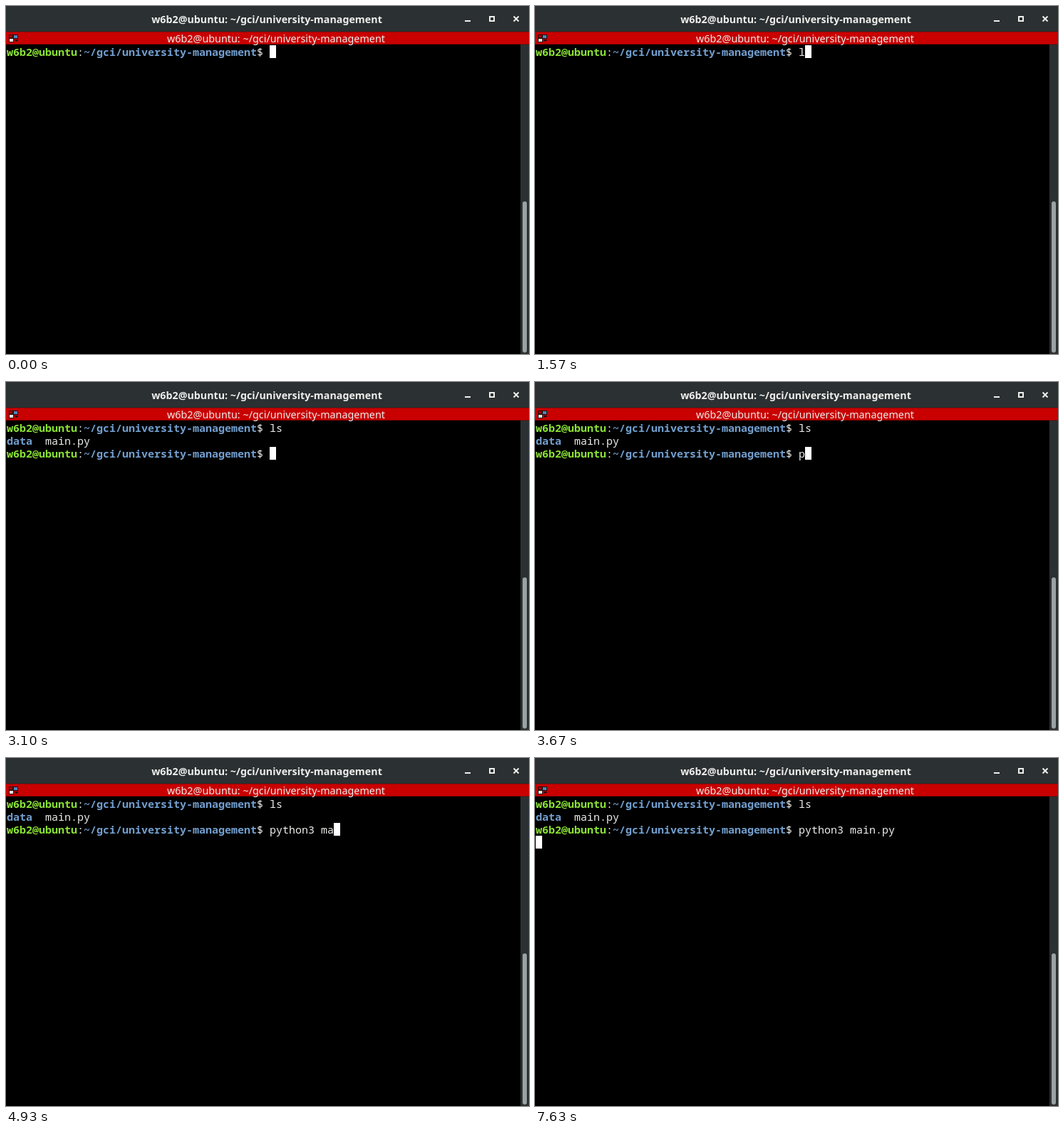
Animation of 734 by 488 pixels, one loop 8 s. Source, as an HTML page:

```html
<!DOCTYPE html>
<html lang="en">
<head>
<meta charset="utf-8">
<title>Terminal session</title>
<style>
  html, body { margin: 0; width: 100%; height: 100%; overflow: hidden; background: #000; }
  svg { display: block; width: 734px; height: 488px; }
  text { white-space: pre; fill: #eeeeec; }
  .bar { font-family: "Noto Sans", sans-serif; text-anchor: middle; }
  .title { font-size: 14.25px; font-weight: 700; }
  .tab { font-size: 14.35px; }
  .row { font: 15px "Noto Sans Mono", monospace; }
  .user { font-weight: 700; fill: #8ae234; }
  .dir { font-weight: 700; fill: #729fcf; }
  .icons { fill: none; stroke: #eeeeec; stroke-width: 2; }
</style>
</head>
<body>
<svg viewBox="0 0 734 488">
  <rect width="734" height="488"/>

  <!-- Title bar -->
  <rect width="734" height="37" fill="#2b3032"/>
  <text class="bar title" x="366" y="24">w6b2@ubuntu: ~/gci/university-management</text>
  <g class="icons">
    <path d="M644 21h8M712.5 14.5l7 7m0-7l-7 7"/>
    <rect x="679" y="15" width="6" height="6"/>
  </g>

  <!-- Tab bar -->
  <rect y="36" width="734" height="18" fill="#8e0000"/>
  <rect y="37" width="734" height="16" fill="#c80000"/>
  <text class="bar tab" x="379" y="51">w6b2@ubuntu: ~/gci/university-management</text>
  <g stroke="#201010">
    <rect x="4.5" y="40.5" width="5" height="4" fill="#b00000"/>
    <rect x="10.5" y="40.5" width="6" height="5" fill="#4f87b8"/>
    <rect x="4.5" y="45.5" width="6" height="5" fill="#e6e6e4"/>
    <path d="M12 47.5h5l-2.5 2z" fill="#201010"/>
  </g>

  <!-- Scrollbar -->
  <rect x="722" y="54" width="12" height="434" fill="#2b3032"/>
  <rect x="725" y="274" width="6" height="212" rx="3" fill="#9aa2a2"/>

  <rect id="cursor" width="9" height="18" fill="#fff"/>
  <g id="rows"></g>
</svg>
<script>
const LOOP = 8000, BLINK = 600, CELL = 9, ROW = 18, LEFT = 1, TOP = 55;
const prompt = '<tspan class="user">w6b2@ubuntu</tspan>:' +
  '<tspan class="dir">~/gci/university-management</tspan>$ ';
const promptLength = 41;

// Each key press: time, text typed so far, row on which the cursor stands.
const keys = [
  [-30, '', 0], [1570, 'l', 0], [1700, 'ls', 0], [1900, '', 2],
  [3270, 'p', 2], [3700, 'py', 2], [3830, 'pyt', 2], [4000, 'pyth', 2],
  [4300, 'pytho', 2], [4350, 'python', 2], [4400, 'python3', 2],
  [4500, 'python3 ', 2], [4770, 'python3 m', 2], [4870, 'python3 ma', 2],
  [5000, 'python3 main.py ', 2], [5200, '', 3]
];

const rows = document.getElementById('rows');
const cursor = document.getElementById('cursor');
let shown;

function linesFor(typed, row) {
  if (row === 0) return [prompt + typed];
  const command = row === 3 ? 'python3 main.py' : typed;
  return [prompt + 'ls', '<tspan class="dir">data</tspan>  main.py', prompt + command];
}

function draw(time) {
  const key = keys.findLast(([at]) => at <= time);
  const [at, typed, row] = key;
  if (key !== shown) {
    shown = key;
    rows.innerHTML = linesFor(typed, row).map((line, i) =>
      `<text class="row" x="${LEFT}" y="${TOP + 15 + i * ROW}">${line}</text>`).join('');
    const column = row === 3 ? 0 : promptLength + typed.length;
    cursor.setAttribute('x', LEFT + column * CELL);
    cursor.setAttribute('y', TOP + row * ROW);
  }
  cursor.style.visibility = Math.floor((time - at) / BLINK) % 2 ? 'hidden' : 'visible';
}

const start = performance.now();
function tick() {
  draw((performance.now() - start) % LOOP);
  requestAnimationFrame(tick);
}
tick();
</script>
</body>
</html>
```
